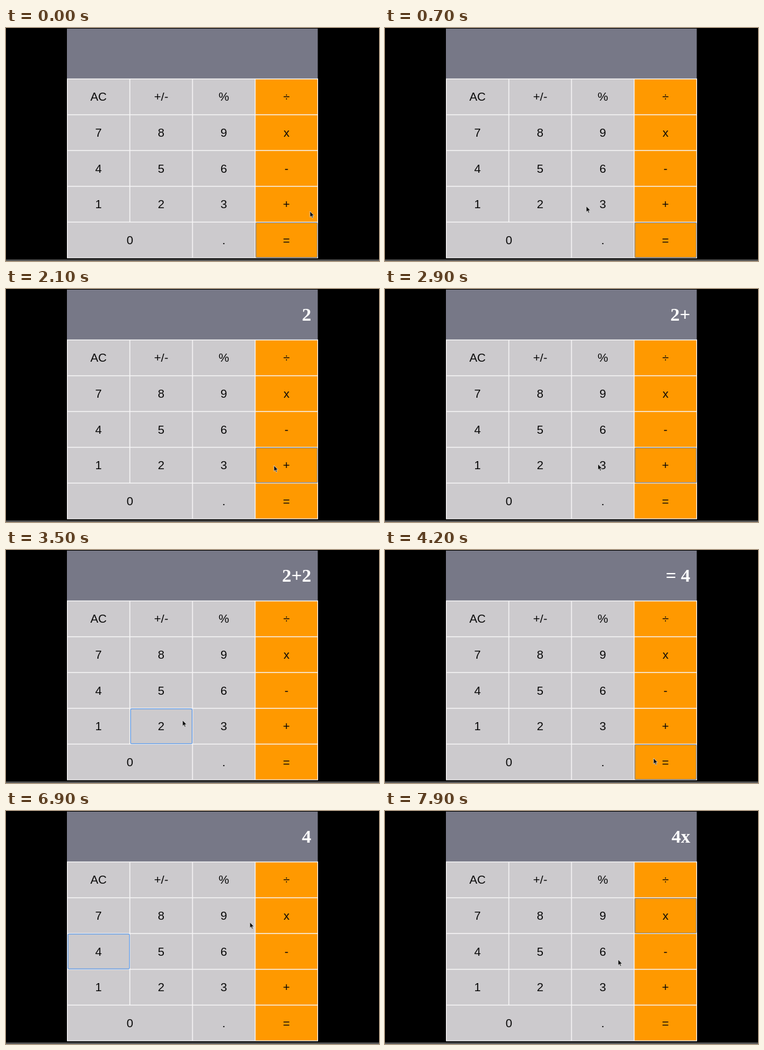
These frames come from a looping animation (600x375 px, 8000 ms). An HTML page:

```html
<!DOCTYPE html>
<html lang="en">
<head>
<meta charset="utf-8">
<title>Calculator</title>
<style>
html, body { margin: 0; width: 100%; height: 100%; overflow: hidden; background: #000; }
svg { display: block; width: 600px; height: 375px; }
.key { font: 19px "Liberation Sans", Arial, sans-serif; text-anchor: middle; fill: #080808; }
#readout { font: bold 30px "Liberation Serif", Times, serif; text-anchor: end; fill: #fff; white-space: pre; }
</style>
</head>
<body>
<svg id="stage" viewBox="0 0 600 375"></svg>
<script>
const LOOP = 8000, STEP = 100;
const LEFT = 98.5, TOP = 82, CELL_W = 100.75, CELL_H = 57.6;
const GREY = '#cccacd', ORANGE = '#ff9900';
const stage = document.getElementById('stage');

function add(name, attrs, text) {
  const el = document.createElementNS('http://www.w3.org/2000/svg', name);
  for (const k in attrs) el.setAttribute(k, attrs[k]);
  if (text) el.textContent = text;
  stage.appendChild(el);
  return el;
}

function box(x, y, width, height, fill) {
  return add('rect', { x, y, width, height, fill });
}

box(0, 0, 600, 375, '#000');
box(0, 372, 600, 1, '#2a2a2a');
box(0, 373, 600, 2, '#585858');
box(98, 1, 403.5, 81, '#777887');
box(98, 81.3, 404, 289.2, '#f6f5f6');

const keys = {};
const rows = [
  ['AC', '+/-', '%', '÷'],
  ['7', '8', '9', 'x'],
  ['4', '5', '6', '-'],
  ['1', '2', '3', '+'],
  ['0', null, '.', '=']
];
rows.forEach((row, r) => row.forEach((label, c) => {
  if (label === null) return;
  const span = label === '0' ? 2 : 1;
  const x = LEFT + c * CELL_W, y = TOP + r * CELL_H, w = CELL_W * span;
  keys[label] = { x, y, w, warm: c === 3 };
  box(x + .7, y + .7, w - 1.4, CELL_H - 1.4, c === 3 ? ORANGE : GREY);
  add('text', { class: 'key', x: x + w / 2, y: y + 35.3 }, label);
}));

const ring = add('rect', { fill: 'none', 'stroke-width': 1.2, rx: 1.5 });
const readout = add('text', { id: 'readout', x: 491, y: 51 });
const pointer = add('path', {
  d: 'M0 0V9.4L2.1 7.5L3.6 11L5.2 10.3L3.7 7H6.6Z',
  fill: '#0a0a0a', stroke: '#e8e8e8', 'stroke-width': .7, 'stroke-linejoin': 'round'
});

// Each entry holds from its start time.
const focus = [[0, '='], [1200, '2'], [2100, '+'], [3200, '2'], [4100, '='], [6100, '4'], [7100, 'x']];
const display = [[0, ''], [1300, '2'], [2200, '2+'], [3300, '2+2'], [4200, '= 4'], [5200, ''], [6200, '4'], [7200, '4x']];

// Pointer stops: time, x, y
const stops = [
  [0, 489, 295], [1050, 266, 284], [1500, 266, 284], [2050, 431, 284],
  [2400, 431, 284], [2500, 430, 284], [2600, 430, 284], [3150, 276, 280],
  [3400, 276, 280], [3500, 284, 274], [4050, 432, 335], [5150, 432, 335],
  [6000, 157, 223], [6400, 157, 223], [7050, 429, 172], [7400, 429, 172],
  [7900, 375, 239], [8000, 375, 239]
];

function valueAt(list, t) {
  let value = list[0][1];
  for (const [start, v] of list) if (t >= start) value = v;
  return value;
}

function pointerAt(t) {
  const i = stops.findIndex(s => s[0] > t);
  const [t0, x0, y0] = stops[i - 1], [t1, x1, y1] = stops[i];
  const p = (t - t0) / (t1 - t0), e = p * p * (3 - 2 * p);
  return [x0 + (x1 - x0) * e, y0 + (y1 - y0) * e];
}

function draw(t) {
  const k = keys[valueAt(focus, t)];
  ring.setAttribute('x', k.x + 1.2);
  ring.setAttribute('y', k.y + .9);
  ring.setAttribute('width', k.w - 1.8);
  ring.setAttribute('height', CELL_H - 1.6);
  ring.setAttribute('stroke', k.warm ? '#858a94' : '#5f9ae6');
  readout.textContent = valueAt(display, t);
  const [x, y] = pointerAt(t);
  pointer.setAttribute('transform', `translate(${x} ${y})`);
}

const began = performance.now();
function tick() {
  const t = (performance.now() - began) % LOOP;
  draw(Math.floor(t / STEP) * STEP);
  requestAnimationFrame(tick);
}
draw(0);
requestAnimationFrame(tick);
</script>
</body>
</html>
```
